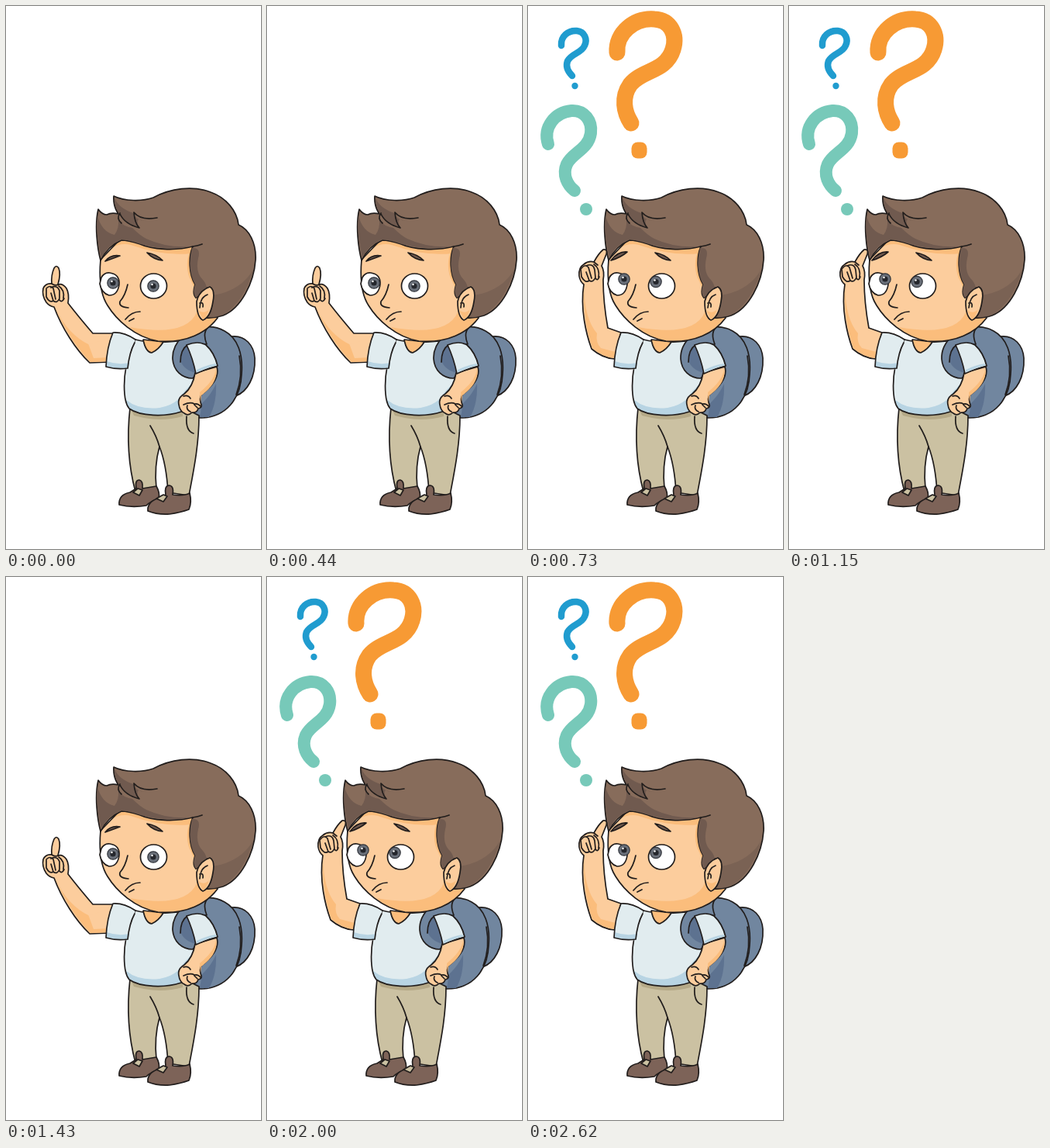
Write an HTML page that moves like this. It is 329x700 px and loops after 3030 ms.

```html
<!DOCTYPE html>
<html lang="en">
<head>
<meta charset="utf-8">
<title>Wondering boy</title>
<style>
html, body { margin: 0; height: 100%; overflow: hidden; background: #fff; }
svg { display: block; width: 100vw; height: 100vh; }
path, ellipse, circle { stroke-linecap: round; stroke-linejoin: round; }
.ink { stroke: #211d1c; stroke-width: 1.7; }
.line { fill: none; }
.skin { fill: #fccd9d; }
.tan { fill: #fbbd7c; }
.hair { fill: #876c5b; }
.dark { fill: #705a4f; }
.bag { fill: #71869f; }
.navy { fill: #5d7290; }
.shirt { fill: #e1ecef; }
.ice { fill: #b8d4e3; }
.pants { fill: #cbc1a2; }
.khaki { fill: #b5a987; }
.shoe { fill: #7d6358; }
.white { fill: #fff; }
.iris { fill: #6a707a; stroke: #30333a; stroke-width: 1.2; }
.pupil { fill: #25272d; }
.mark { fill: none; }
</style>
</head>
<body>
<svg viewBox="0 0 329 700">
  <defs>
    <g id="eyeball">
      <circle class="iris" r="7.2"/>
      <circle class="pupil" r="3.6"/>
      <circle class="white" cx="-1.5" cy="-2" r="1.2"/>
    </g>
    <clipPath id="faceClip"><path id="faceShape" d="M122 327C120 350 121 371 131 386C142 404 166 427 196 432C233 435 259 421 273 402L266 362L245 376L250 300L150 298Z"/></clipPath>
    <clipPath id="shirtClip"><path id="shirtShape" d="M167 430C156 449 151 478 153 500Q154 513 159 519C173 529 205 530 226 523C240 512 244 488 245 462L231 431Q190 436 167 430Z"/></clipPath>
  </defs>

  <g id="body">
    <!-- backpack -->
    <path class="bag ink" d="M291 426C309 424 320 438 321 454C322 478 312 497 296 503Z"/>
    <path class="bag ink" d="M230 428C243 414 264 409 282 419C299 428 306 449 304 474C303 506 284 531 250 531L233 520Z"/>
    <path class="navy" d="M250 530L253 512Q264 502 271 487Q272 513 262 530Z"/>
    <path class="navy" d="M262 414Q253 420 258 433L236 432Q242 420 262 414Z"/>
    <path class="line ink" d="M301 451Q306 477 297 501"/>

    <!-- trousers -->
    <path class="pants ink" d="M160 518C156 554 158 593 167 626L194 622Q191 593 198 568Q207 591 209 627L236 631C242 599 249 566 249 528L227 517Z"/>
    <path class="khaki" d="M161 519Q190 533 228 523V529Q203 536 178 531L165 528Z"/>
    <path class="line ink" d="M186 541Q194 554 198 568M233 529C232 542 235 549 242 551"/>

    <!-- shoes -->
    <path class="shoe ink" d="M146 643Q145 630 160 627L168 622Q166 611 172 611Q177 612 176 622L194 619Q199 628 197 635Q187 638 181 644Q162 647 146 643Z"/>
    <path class="pants ink" d="M164 627L170 622L176 624L172 631Z"/>
    <path class="shoe ink" d="M183 651Q182 640 195 635L206 630Q204 619 210 618Q217 618 215 630Q229 632 237 628Q240 640 236 649Q225 653 211 655Q195 656 183 651Z"/>
    <path class="pants ink" d="M194 635L203 630L208 632L203 639Z"/>

    <!-- shirt -->
    <use href="#shirtShape" class="shirt"/>
    <path class="ice" clip-path="url(#shirtClip)" d="M153 506Q169 521 198 518Q221 514 229 498L246 480V535H150Z"/>
    <use href="#shirtShape" class="line ink"/>
    <path class="tan ink" d="M177 430Q180 446 188 447Q197 443 203 433Z"/>

    <!-- strap, far sleeve and resting arm -->
    <path class="bag ink" d="M261 414C236 413 214 433 215 455C216 470 227 480 241 480L247 472L234 437L259 436Q253 421 261 414Z"/>
    <path class="navy" d="M234 437Q226 441 225 457Q229 469 245 473Z"/>
    <path class="line ink" d="M234 437Q225 443 225 459"/>
    <path class="skin ink" d="M272 465C276 479 264 492 252 501Q249 506 252 514Q253 518 248 519Q246 525 240 524Q235 529 230 525Q224 522 223 514Q221 505 230 500Q241 491 244 473Z"/>
    <path class="tan" d="M271 468Q269 483 250 498L251 511L252 502Q274 486 271 468Z"/>
    <path class="line ink" d="M229 503Q235 501 238 506M229 514Q238 510 243 513Q248 512 251 516M234 515Q232 520 238 523M243 514L247 518"/>
    <path class="shirt ink" d="M233 437Q248 431 258 437Q269 447 273 464Q260 467 245 474Q241 454 233 437Z"/>
    <path class="ice" d="M246 469Q258 463 270 461L272 463Q258 467 246 472Z"/>

    <!-- face -->
    <use href="#faceShape" class="skin"/>
    <g class="tan" clip-path="url(#faceClip)">
      <path d="M122 325Q140 303 161 308Q203 323 239 319L253 300H140Z"/>
      <path d="M238 313Q229 336 239 355Q248 371 246 395Q232 427 160 414Q184 442 238 435L279 398V330Z"/>
    </g>
    <use href="#faceShape" class="line ink"/>

    <!-- hair -->
    <path class="hair ink" d="M122 328C118 313 114 283 119 262Q124 269 130 269Q136 266 145 268Q138 258 139 245C153 252 176 252 190 247C212 235 241 231 264 240C284 247 298 264 300 282C314 288 323 306 322 327C320 357 303 390 280 399Q268 403 257 402L259 363L245 376Q240 371 244 359C236 346 235 324 241 310C218 316 188 314 173 307Q157 302 149 302Q132 309 122 328Z"/>
    <path class="dark" d="M118 270Q123 291 140 295Q146 287 145 276Q151 284 163 286Q173 296 181 300Q206 312 239 310Q207 316 174 307Q157 301 149 301Q132 307 123 324Q115 291 118 270Z"/>
    <path class="dark" d="M140 248Q146 261 164 267Q170 282 194 274Q181 279 171 275Q168 279 172 286Q154 280 147 269Q139 258 140 248Z"/>
    <path class="dark" d="M240 312Q252 311 248 325Q244 344 254 353Q260 360 258 366L245 376Q240 370 244 359Q233 339 240 312Z"/>
    <path class="dark" opacity=".55" d="M320 338Q304 367 267 373Q266 391 258 401Q269 403 280 398Q306 383 320 338Z"/>
    <path class="line ink" d="M147 267Q142 274 149 280M147 268Q153 281 172 286Q166 280 165 266Q174 277 195 273M241 310Q248 309 253 307"/>

    <!-- ear -->
    <path class="skin ink" d="M246 381Q249 367 263 362Q270 366 267 381Q264 401 254 405Q246 401 246 381Z"/>
    <path class="tan" d="M248 392Q255 398 262 391Q258 403 254 404Z"/>
    <path class="line ink" d="M260 372Q251 375 250 389M250 383Q255 381 254 388"/>

    <!-- features -->
    <path class="white ink" d="M123 350Q127 343 134 344Q147 346 146 359Q144 373 133 373Q123 370 121 358Z"/>
    <ellipse class="white ink" cx="190.500" cy="361" rx="17" ry="16"/>
    <use id="leftEye" href="#eyeball"/>
    <use id="rightEye" href="#eyeball"/>
    <path id="brows" class="dark ink"/>
    <path class="line ink" d="M157 359Q154 373 147 381Q145 388 158 389M154 404Q162 394 173 394M159 406L165 403"/>
  </g>

  <g id="lowArm">
    <path class="skin ink" d="M139 422L112 422Q94 401 80 383Q82 371 78 364Q73 357 67 359Q71 345 68 338Q65 333 62 338Q58 347 59 358Q51 357 48 364Q46 373 52 382Q56 387 62 388C72 415 90 443 108 460L134 459Z"/>
    <path class="tan" d="M64 390Q80 424 108 437L131 432V458L109 459Q82 431 64 390Z"/>
    <path class="skin" d="M106 435Q119 435 136 424L132 453L113 454Z"/>
    <path class="line ink" d="M59 358Q63 361 68 359M52 364Q57 359 61 364L64 378M58 363Q66 359 69 367L69 377M68 361Q76 366 74 377M52 365L52 375Q56 383 61 380L58 370M61 380Q66 384 69 377M69 379Q72 383 75 377"/>
  </g>

  <g id="highArm">
    <path class="skin ink" d="M120 421L103 415Q97 382 97 353Q99 342 95 335L101 320Q103 313 97 314Q91 319 85 330Q78 328 72 333Q65 337 66 348Q67 355 72 359C67 390 75 423 82 442Q96 454 112 455Z"/>
    <path class="tan" d="M72 361Q73 404 89 422Q87 434 94 441L113 446L112 454Q97 453 83 441Q71 407 72 361Z"/>
    <path class="line ink" d="M85 330L90 334M69 338Q74 332 78 337L82 351M75 335Q84 331 86 340L87 350M85 333Q93 338 91 350M68 339L69 349Q74 358 79 354L75 343M79 354Q84 357 87 350M87 351Q90 355 92 349"/>
  </g>

  <g id="sleeve">
    <path class="shirt" d="M138 421Q152 420 167 429L158 468Q143 469 129 465Q130 440 138 421Z"/>
    <path class="ice" d="M130 458Q144 463 159 460L158 467Q143 468 130 465Z"/>
    <path class="line ink" d="M167 430Q152 420 138 421Q130 440 129 465Q143 469 157 467M166 434Q159 447 157 467"/>
  </g>

  <g id="marks">
    <g stroke="#f79a34" fill="#f79a34">
      <path class="mark" stroke-width="21" d="M115 60C113 35 137 15 163 17C184 18 193 37 187 56C178 85 147 82 132 101C120 118 124 137 133 151"/>
      <rect x="133.500" y="175.500" width="20" height="21" rx="8" stroke="none"/>
    </g>
    <g stroke="#209ccf" fill="#209ccf">
      <path class="mark" stroke-width="8.500" d="M43 51C42 39 52 31 63 32C73 33 77 43 73 51C69 61 56 61 51 71C48 79 52 85 57 90"/>
      <circle cx="60.500" cy="103" r="4.200" stroke="none"/>
    </g>
    <g stroke="#77c9b9" fill="#77c9b9">
      <path class="mark" stroke-width="16" d="M26 178C19 156 35 137 56 135C73 134 83 148 81 164C78 185 57 189 50 204C44 218 51 231 60 238"/>
      <circle cx="75" cy="262" r="8" stroke="none"/>
    </g>
  </g>
</svg>
<script>
const LOOP = 3030;
const $ = id => document.getElementById(id);
const move = (id, x, y) => $(id).setAttribute("transform", `translate(${x} ${y})`);
const show = (id, on) => $(id).setAttribute("visibility", on ? "visible" : "hidden");

const rightBrow = "M182 318Q194 320 202 328Q190 327 182 318Z";
const sadBrows = "M128 329Q135 320 147 322Q139 325 128 329Z" + rightBrow;
const raisedBrows = "M125 328Q134 316 146 317Q138 324 125 328Z" + rightBrow;

function pose(thinking) {
  const shift = thinking ? -18 : 0;
  move("body", shift, 0);
  move("sleeve", shift, 0);
  move("leftEye", thinking ? 142 : 138, thinking ? 352 : 357);
  move("rightEye", thinking ? 183 : 190, thinking ? 355.5 : 361);
  $("brows").setAttribute("d", thinking ? raisedBrows : sadBrows);
  show("lowArm", !thinking);
  show("highArm", thinking);
  show("marks", thinking);
}

const start = performance.now();
function tick() {
  const t = (performance.now() - start) % LOOP;
  pose(t >= 730 && t < 1430 || t >= 2000);
  requestAnimationFrame(tick);
}
tick();
</script>
</body>
</html>
```
